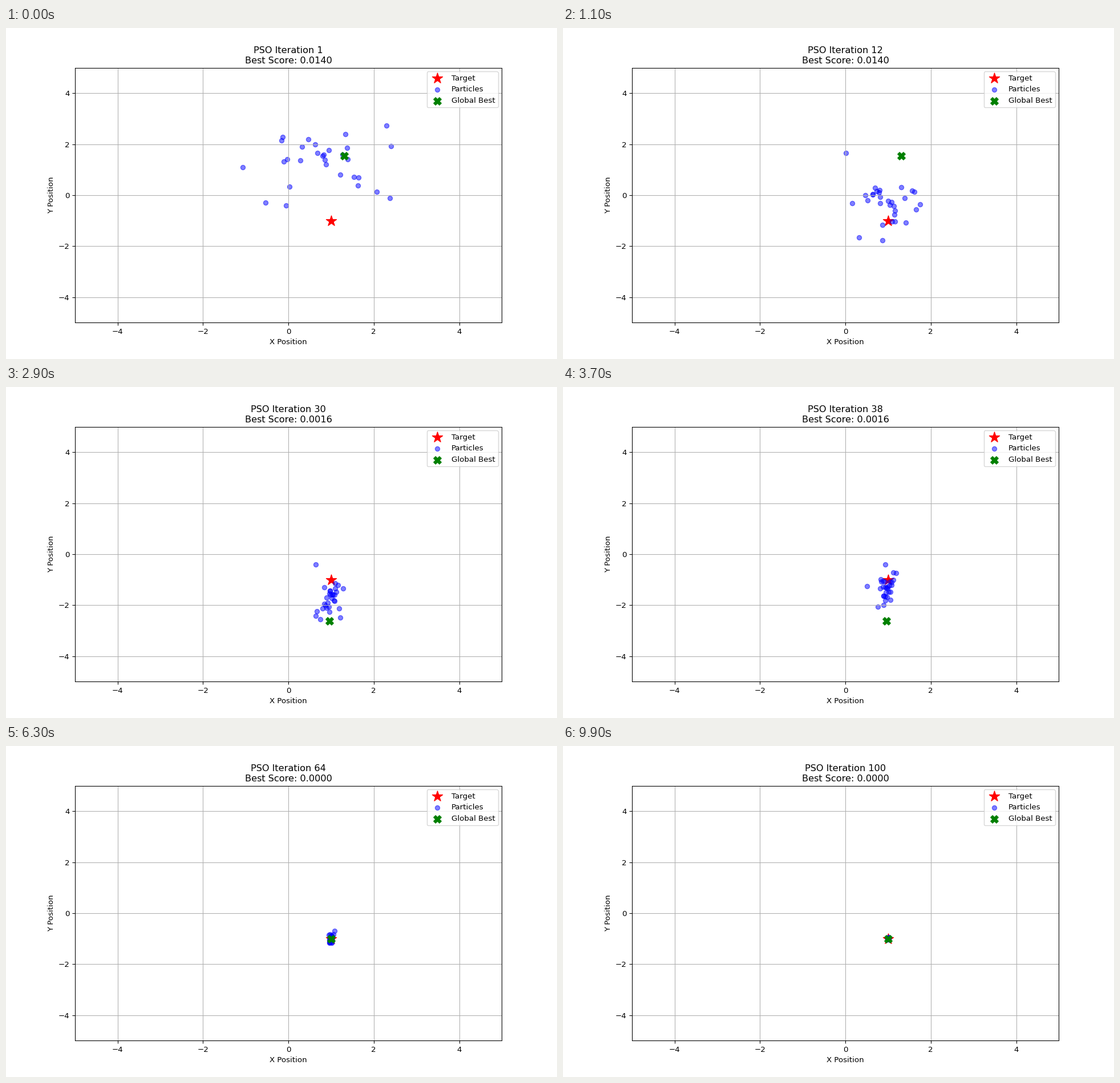
A matplotlib script that plays this animation: 966x580 px, repeating every 10 s.

```python
import numpy as np
import matplotlib.pyplot as plt
from matplotlib.animation import FuncAnimation

FRAMES, INTERVAL = 100, 100
COUNT = 30
BOUND = 5
TARGET = (1, -1)
DPI = 96.6

# Each particle swings around the swarm center; a few swing much wider.
rng = np.random.default_rng(7)
reach = rng.lognormal(-0.3, 0.8, (COUNT, 1))
phase = rng.uniform(0, 2 * np.pi, (COUNT, 2))
speed = 2 * np.pi / rng.uniform(6, 10, (COUNT, 2))

# (first step, position, score)
bests = [
    (0, (1.31, 1.55), 0.0140),
    (20, (0.96, -2.62), 0.0016),
    (38, (1.00, -1.05), 0.0002),
    (54, TARGET, 0.0000),
]


def positions(step):
    """The swarm narrows quickly in x and more slowly in y."""
    center = 1, np.interp(step, [0, 11, 29, 47], [1.3, -0.2, -1.6, -1])
    spread = 1.5 * np.exp(-step / 20), 1.9 * np.exp(-(step / 38) ** 1.4)
    swing = reach * np.cos(phase + speed * step)
    return np.clip(center + swing * spread, -BOUND, BOUND)


fig, ax = plt.subplots(figsize=(966 / DPI, 580 / DPI), dpi=DPI)
ax.set(xlim=(-BOUND, BOUND), ylim=(-BOUND, BOUND),
       xlabel="X Position", ylabel="Y Position")
ax.grid(True)
ax.scatter(*TARGET, s=200, c="red", marker="*", label="Target")
particles = ax.scatter(*positions(0).T, c="blue", alpha=0.5, label="Particles")
best = ax.scatter(*bests[0][1], s=100, c="green", marker="X", label="Global Best")
ax.legend(loc="upper right")


def update(step):
    _, place, score = [b for b in bests if b[0] <= step][-1]
    particles.set_offsets(positions(step))
    best.set_offsets([place])
    ax.set_title(f"PSO Iteration {step + 1}\nBest Score: {score:.4f}")
    return particles, best


anim = FuncAnimation(fig, update, frames=FRAMES, interval=INTERVAL, repeat=True)
plt.show()
```
